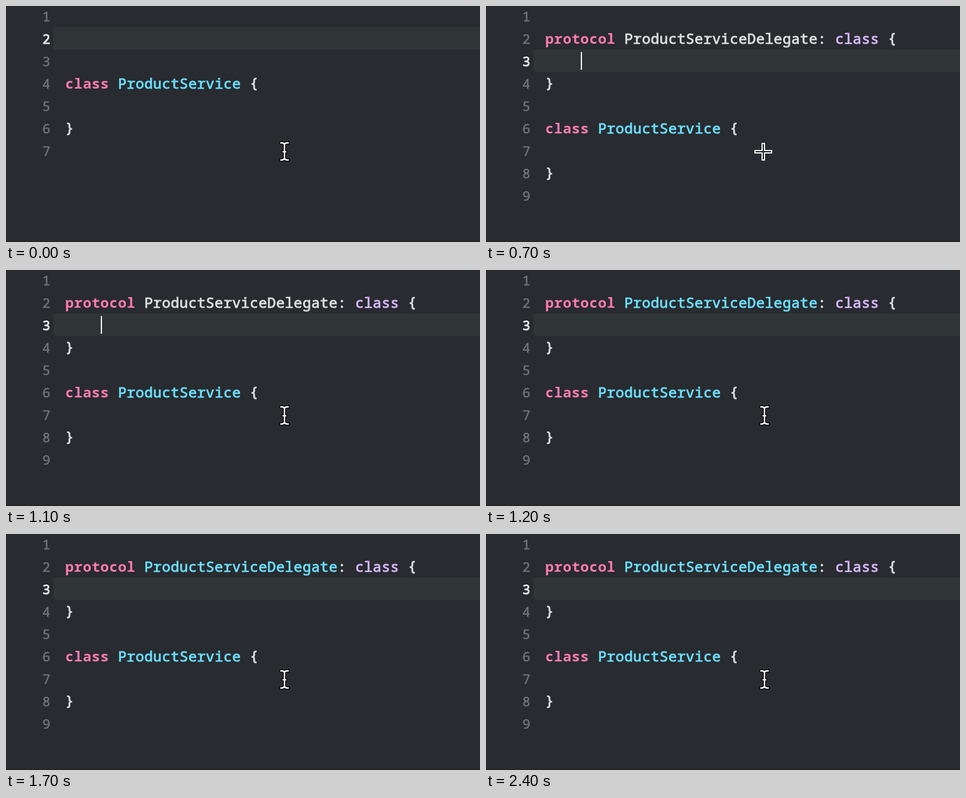
An HTML page that plays this animation: 800x400 px, repeating every 2.5 s.

```html
<!DOCTYPE html>
<html lang="en">
<head>
<meta charset="utf-8">
<title>Code editor</title>
<style>
  html, body { margin: 0; width: 100%; height: 100%; overflow: hidden; background: #282b2f; }
  svg { display: block; width: 800px; height: 400px; }
  /* the thin stroke gives regular glyphs a medium weight */
  text, tspan { fill: currentColor; stroke: currentColor; }
  text { white-space: pre; font: 24px "Noto Sans Mono", "DejaVu Sans Mono", monospace; stroke-width: .9px; }
  .code { color: #dfdfe0; letter-spacing: .43px; }
  .key { color: #ff7ab2; font-weight: 700; stroke-width: 0; }
  .type { color: #6bdfff; }
  .word { color: #dabaff; }
  .nums { color: #707377; }
  .nums text { font-size: 22px; text-anchor: middle; stroke-width: .6px; }

  .row, .caret, .block, .added, .name, .leave, .enter, .cross, .beam {
    animation: 2500ms step-end infinite;
  }
  .row   { animation-name: row; }
  .caret { animation-name: move, blink; }
  .block { animation-name: block; }
  .added { animation-name: added; }
  .name  { animation-name: name; }
  .leave { animation-name: leave; }
  .enter { animation-name: enter; }
  .cross { animation-name: cross; }
  .beam  { animation-name: beam; }

  /* the snippet lands at 28% (700 ms) */
  @keyframes row   { 0% { transform: none } 28%, 100% { transform: translateY(38px) } }
  @keyframes move  { 0% { transform: none } 28%, 100% { transform: translate(60px, 38px) } }
  @keyframes block { 0% { transform: none } 28%, 100% { transform: translateY(76px) } }
  @keyframes added { 0% { opacity: 0 } 28%, 100% { opacity: 1 } }
  @keyframes leave { 0% { color: #e8e8e9; stroke-width: 1px } 28%, 100% { color: #707377; stroke-width: .6px } }
  @keyframes enter { 0% { color: #707377; stroke-width: .6px } 28%, 100% { color: #e8e8e9; stroke-width: 1px } }

  /* highlighting of the new type follows at 1200 ms */
  @keyframes name  { 0% { color: #dfdfe0 } 48%, 100% { color: #6bdfff } }
  @keyframes blink { 0% { opacity: 0 } 4% { opacity: 1 } 48% { opacity: 0 } 72% { opacity: 1 } 96%, 100% { opacity: 0 } }
  @keyframes cross { 0% { opacity: 0 } 8% { opacity: 1 } 36%, 100% { opacity: 0 } }
  @keyframes beam  { 0% { opacity: 1 } 8% { opacity: 0 } 36%, 100% { opacity: 1 } }
</style>
</head>
<body>
<svg viewBox="0 0 800 400">
  <defs>
    <path id="ibeam" d="M464 232h1.500q4.500 0 4.500 4v21q0 4-4.500 4H464M476 232h-1.500q-4.500 0-4.500 4v21q0 4 4.500 4h1.500M468 247h4"/>
  </defs>

  <rect width="800" height="400" fill="#282b2f"/>
  <rect class="row" x="80" y="36" width="720" height="38" fill="#2f3437"/>
  <rect y="398" width="800" height="2" fill="#232529"/>

  <g class="nums">
    <text x="68" y="26">1</text>
    <text x="68" y="64" class="leave">2</text>
    <text x="68" y="102" class="enter">3</text>
    <text x="68" y="140">4</text>
    <text x="68" y="178">5</text>
    <text x="68" y="216">6</text>
    <text x="68" y="254">7</text>
    <g class="added">
      <text x="68" y="292">8</text>
      <text x="68" y="330">9</text>
    </g>
  </g>

  <g class="code added">
    <text x="100" y="64"><tspan class="key">protocol</tspan> <tspan class="name">ProductServiceDelegate</tspan>: <tspan class="word">class</tspan> <tspan dy="-1">{</tspan></text>
    <text x="100" y="139">}</text>
  </g>
  <g class="code block">
    <text x="100" y="140"><tspan class="key">class</tspan> <tspan class="type">ProductService</tspan> <tspan dy="-1">{</tspan></text>
    <text x="100" y="215">}</text>
  </g>

  <rect class="caret" x="100" y="40" width="2" height="30" fill="#fff"/>

  <path class="cross" d="M466 233h4v12h12v4h-12v12h-4v-12h-12v-4h12z" fill="#1b1c1f" stroke="#fff" stroke-width="2"/>
  <g class="beam" fill="none" stroke-linecap="square">
    <use href="#ibeam" stroke="#000" stroke-width="5"/>
    <use href="#ibeam" stroke="#fff" stroke-width="2.400"/>
  </g>
</svg>
</body>
</html>
```
